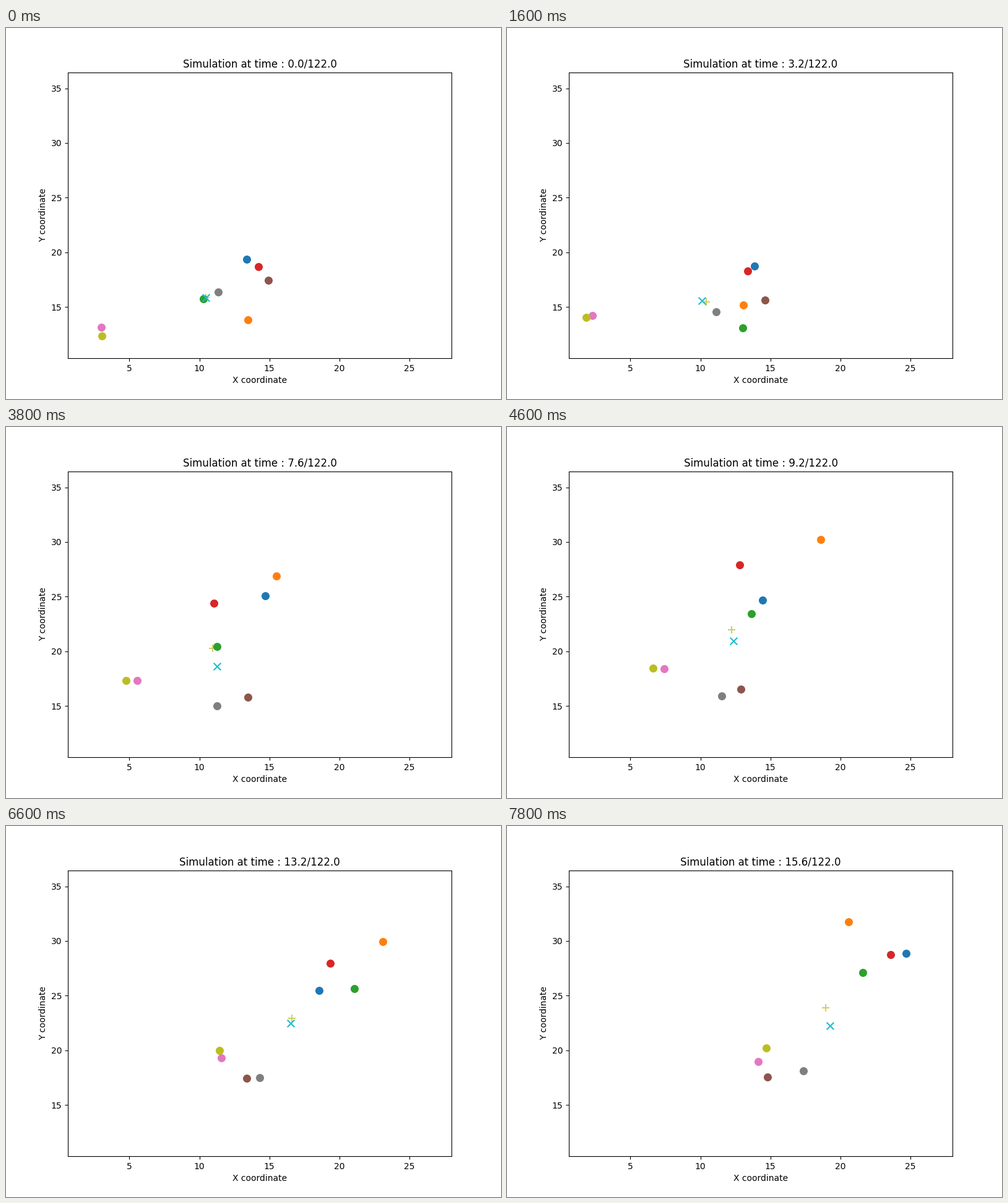
Recreate the animation shown at these times as a matplotlib script. Size 800 by 600 pixels, loop 8000 ms.

```python
import numpy as np
import matplotlib.pyplot as plt
from matplotlib.animation import FuncAnimation

FRAMES, INTERVAL = 40, 200
STEP, TOTAL = 0.4, 122.0
XLIM, YLIM = (0.6, 28.02), (10.316, 36.446)
SIZE = 70

# Key times in seconds: agents that wander, and agents that drift
QUICK = [0, 2.6, 3.8, 5.4, 6.6, 7.8]
EARLY = [0, 1.6, 2.6, 3.8, 5.4, 7.8]
DRIFT = [0, 2.6, 5.4, 7.8]
TURN = [0, 1.6, 5.4, 7.8]

# Turning points as x + yj in stage pixels, y pointing down
AGENTS = {
    "C0": (EARLY, [389+374j, 400+385j, 447+329j, 419+273j, 428+292j, 645+206j]),
    "C1": (QUICK, [391+472j, 397+379j, 437+241j, 576+156j, 609+187j, 552+155j]),
    "C2": (QUICK, [319+438j, 381+454j, 341+355j, 474+267j, 563+263j, 575+237j]),
    "C3": (QUICK, [408+386j, 369+361j, 336+285j, 439+183j, 524+222j, 620+208j]),
    "C5": (DRIFT, [424+408j, 409+447j, 375+414j, 421+406j]),
    "C6": (TURN, [154+484j, 138+465j, 293+379j, 406+381j]),
    "C7": (DRIFT, [343+427j, 339+464j, 363+421j, 479+396j]),
    "C8": (TURN, [155+498j, 128+468j, 279+375j, 419+359j]),
}


def glide(times, points, t):
    """Smooth cubic path through the points, sampled at times t."""
    k, p = np.array(times, float), np.array(points)
    m = np.gradient(p, k, edge_order=2)
    i = np.clip(np.searchsorted(k, t, side="right") - 1, 0, len(k) - 2)
    h = k[i + 1] - k[i]
    s = (t - k[i]) / h
    return ((1 + 2 * s) * (1 - s) ** 2 * p[i] + s * (1 - s) ** 2 * h * m[i]
            + s * s * (3 - 2 * s) * p[i + 1] + s * s * (s - 1) * h * m[i + 1])


def to_data(p):
    """Stage pixels to axes coordinates."""
    u, v = (p.real - 100) / 620, (534 - p.imag) / 462
    return np.column_stack([XLIM[0] + u * (XLIM[1] - XLIM[0]),
                            YLIM[0] + v * (YLIM[1] - YLIM[0])])


seconds = np.arange(FRAMES) * INTERVAL / 1000
paths = {c: glide(*keys, seconds) for c, keys in AGENTS.items()}
centre = np.mean(list(paths.values()), axis=0)

# The estimate starts on the centre, then swings around a point below it
swing = np.cos(2 * np.pi * (seconds - 3.8) / 4)
estimate = centre + np.minimum(1, seconds / 1.6) * (13j + (7 + 16j) * swing)

fig, ax = plt.subplots(figsize=(8, 6), dpi=100)
ax.set(xlim=XLIM, ylim=YLIM, xlabel="X coordinate", ylabel="Y coordinate")
title = ax.set_title("")


def add_mark(path, marker, color, **style):
    spots = to_data(path)
    mark = ax.scatter(*spots[0], s=SIZE, marker=marker, color=color, **style)
    return mark, spots


marks = [add_mark(centre, "+", "C8", alpha=0.7)]
marks += [add_mark(path, "o", c) for c, path in paths.items()]
marks.append(add_mark(estimate, "x", "C9"))


def update(n):
    title.set_text(f"Simulation at time : {n * STEP:.1f}/{TOTAL}")
    for mark, spots in marks:
        mark.set_offsets(spots[n])
    return [title] + [mark for mark, _ in marks]


anim = FuncAnimation(fig, update, frames=FRAMES, interval=INTERVAL,
                     repeat=True, repeat_delay=0)
plt.show()
```
